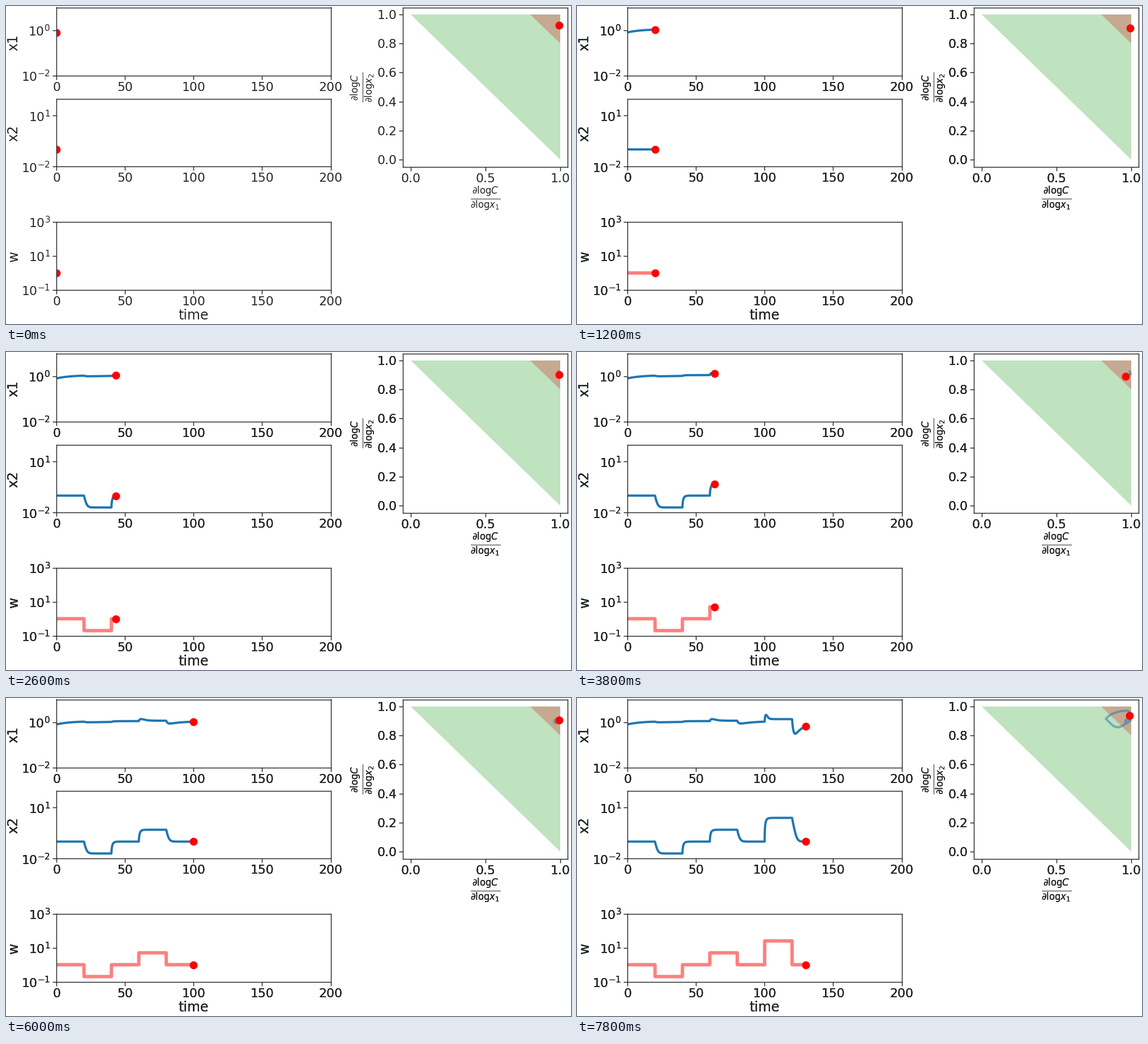
A matplotlib script for the animation above (8000 ms loop, 998 by 561 pixels).

```python
import numpy as np
import matplotlib.pyplot as plt
from matplotlib.animation import FuncAnimation
from matplotlib.artist import Artist

W, H, DPI = 998, 561, 64
PX = 72 / DPI            # points per pixel
INK = "0.15"
BLUE, GREEN, RED = "#1f77b4", "#2ca02c", "#d62728"

FRAMES, INTERVAL = 40, 200
SUB = 100                # integration steps per frame
DT = 10 / 3 / SUB
HOLD = 600               # steps between input switches
LEVELS = [1, 0.2, 1, 5, 1, 25, 1]
KD = 10

plt.rcParams.update({
    "font.family": "DejaVu Sans",
    "mathtext.fontset": "dejavusans",
    "axes.edgecolor": INK,
    "axes.linewidth": 1.46 * PX,
    "xtick.color": INK,
    "ytick.color": INK,
    "text.color": INK,
    "lines.solid_capstyle": "round",
    "lines.solid_joinstyle": "round",
})


def bound(x1, x2):
    """Complex formed by two binding partners with dissociation constant KD."""
    s = x1 + x2 + KD
    return (s - np.sqrt(s * s - 4 * x1 * x2)) / 2


def slope(x, w):
    return np.array([0.1 * w - 10 * bound(*x), 0.1 * w - x[1]])


def simulate():
    n = (FRAMES - 1) * SUB + 1
    w = np.array([LEVELS[max(i - 1, 0) // HOLD] for i in range(n)], float)
    x = np.empty((n, 2))
    x[0] = 0.8, 0.1
    for i in range(1, n):
        k1 = slope(x[i - 1], w[i])
        k2 = slope(x[i - 1] + DT * k1, w[i])
        x[i] = x[i - 1] + DT * (k1 + k2) / 2
    return np.arange(n) * DT, x[:, 0], x[:, 1], w


t, x1, x2, w = simulate()
c = bound(x1, x2)
a, b = x1 - c, x2 - c
norm = c * (KD + a + b)
order1, order2 = x1 * b / norm, x2 * a / norm

fig = plt.figure(figsize=(W / DPI, H / DPI), dpi=DPI, facecolor="white")


def panel(left, top, right, bottom):
    ax = fig.add_axes([left / W, 1 - bottom / H,
                       (right - left) / W, (bottom - top) / H])
    ax.tick_params(length=7 * PX, width=1.46 * PX, pad=4.1 * PX,
                   labelsize=21.9 * PX)
    return ax


def label(x, y, text, rotation=0):
    return fig.text(x / W, 1 - y / H, text, rotation=rotation,
                    rotation_mode="anchor", ha="center", va="baseline",
                    fontsize=23.8 * PX)


def time_panel(top, bottom, low, high, powers):
    ax = panel(89.3, top, 573.5, bottom)
    ax.set_xlim(0, 200)
    ax.set_xticks(range(0, 201, 50))
    ax.set_yscale("log")
    ax.set_ylim(10.0 ** low, 10.0 ** high)
    ax.set_yticks([10.0 ** p for p in powers],
                  [r"$\mathdefault{10^{%d}}$" % p for p in powers])
    ax.minorticks_off()
    return ax


def trace(ax, xs, ys, color, width, alpha=1):
    line, = ax.plot([], [], color=color, lw=width * PX, alpha=alpha)
    dot, = ax.plot([], [], "o", color="red", ms=14 * PX, mew=0)
    return line, dot, xs, ys


def frac(i):
    return (r"$\frac{\partial\mathrm{log}C}"
            r"{\partial\mathrm{log}x_%d}$" % i)


ax1 = time_panel(2.5, 123, -2, 1, [-2, 0])
ax2 = time_panel(163.5, 283.3, -2, 2, [-2, 1])
axw = time_panel(380.5, 500.5, -1, 3, [-1, 1, 3])

phase = panel(701.3, 2.5, 992, 283.5)
phase.set_xlim(-0.05, 1.05)
phase.set_ylim(-0.05, 1.05)
phase.set_xticks([0, 0.5, 1], ["0.0", "0.5", "1.0"])
ticks = np.arange(6) / 5
phase.set_yticks(ticks, ["%.1f" % v for v in ticks])
phase.fill([0, 1, 1], [1, 1, 0], color=GREEN, alpha=0.3, lw=0)
phase.fill([0.8, 1, 1], [1, 1, 0.8], color=RED, alpha=0.3, lw=0)

texts = [
    label(20.5, 64, "x1", 90),
    label(20.5, 224.5, "x2", 90),
    label(20.5, 441.5, "w", 90),
    label(331.3, 553.3, "time"),
    label(847, 347, frac(1)),
    label(638.5, 143.5, frac(2), 90),
]
for ax in (ax1, ax2, axw, phase):
    texts += ax.get_xticklabels() + ax.get_yticklabels()


class Overprint(Artist):
    """Draws the lettering again on top of itself, which makes it heavier."""

    def draw(self, renderer):
        if self.get_visible():
            for _ in range(2):
                for text in texts:
                    text.draw(renderer)


heavy = Overprint()
heavy.set_zorder(10)
fig.add_artist(heavy)

traces = [
    trace(ax1, t, x1, BLUE, 4),
    trace(ax2, t, x2, BLUE, 4),
    trace(axw, t, w, "red", 6, 0.5),
    trace(phase, order2, order1, BLUE, 4, 0.5),
]


def update(frame):
    end = frame * SUB
    for line, dot, xs, ys in traces:
        line.set_data(xs[:end + 1], ys[:end + 1])
        dot.set_data([xs[end]], [ys[end]])
    heavy.set_visible(frame > 0)
    return [part for tr in traces for part in tr[:2]]


anim = FuncAnimation(fig, update, frames=FRAMES, interval=INTERVAL,
                     repeat=True, blit=False)
plt.show()
```
